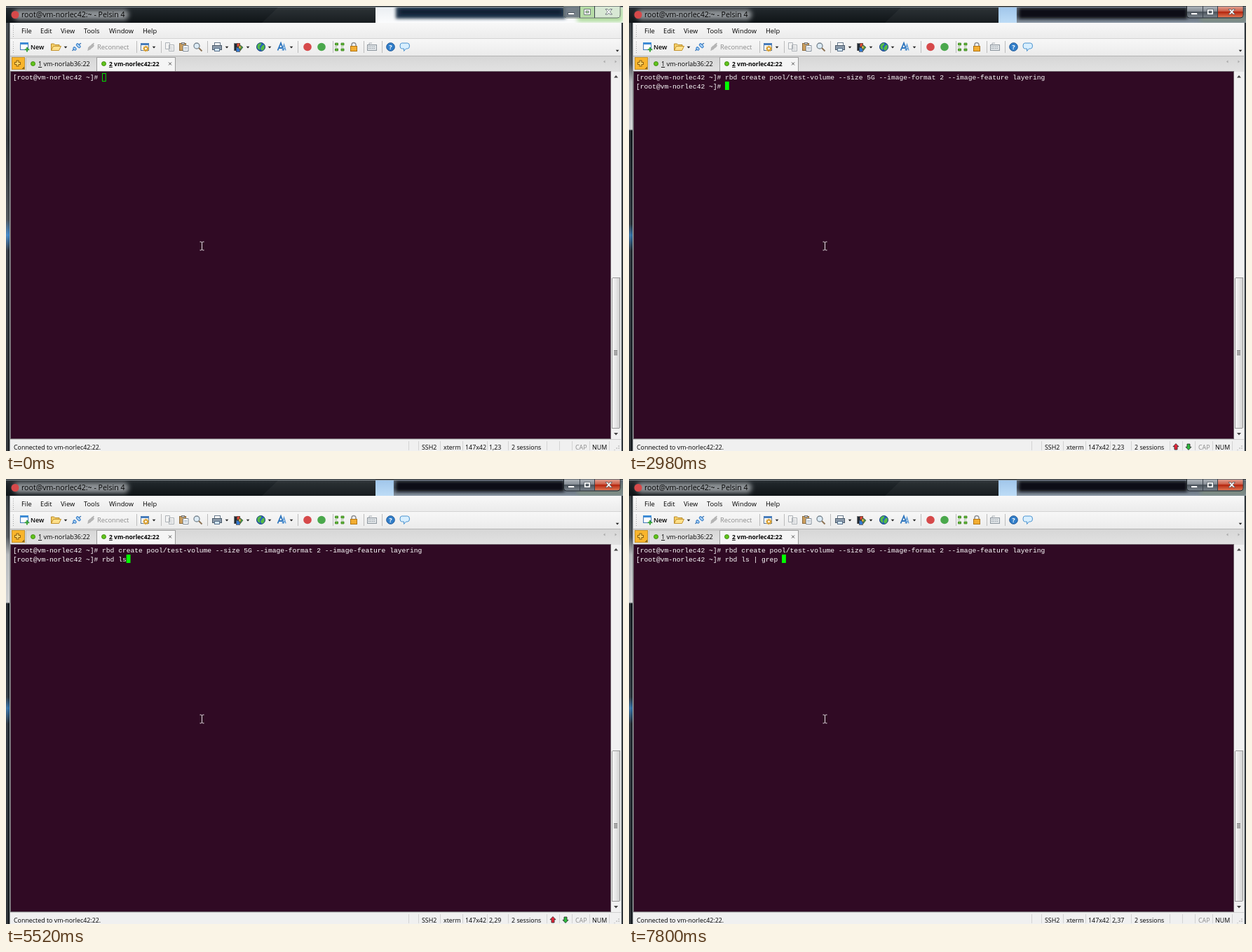
Recreate the animation shown at these times as an HTML page. Size 880x636 px, loop 8000 ms.

```html
<!DOCTYPE html>
<html lang="en">
<head>
<meta charset="utf-8">
<title>Terminal session</title>
<style>
  html, body { margin: 0; width: 100%; height: 100%; overflow: hidden; background: #111; }
  svg { display: block; width: 880px; height: 636px; }
  text { font: 9.3px "Open Sans", "Noto Sans", sans-serif; fill: #000; white-space: pre; }
  rect, .crisp { shape-rendering: crispEdges; }
  .status text { font-size: 8.9px; }
  .title { font-size: 10.6px; }
  .tab { font-size: 9px; }
  .tab.bold { font-weight: 700; font-size: 8.5px; }
  .dim { fill: #8b8b8b; }
  .term text { font: 9.65px "Liberation Mono", "Courier New", monospace; fill: #fff; }
  .idle .active, svg:not(.idle) .inactive { display: none; }
  .line { fill: none; stroke-width: 1; }
  #cursor { fill: #00ff00; shape-rendering: auto; }
  .idle #cursor { fill: none; stroke: #00e000; }
</style>
</head>
<body>
<svg id="stage" class="idle" viewBox="0 0 880 636">
  <defs>
    <linearGradient id="dark" x2="0" y2="1">
      <stop offset="0" stop-color="#3a4045"/><stop offset=".25" stop-color="#20262a"/><stop offset="1" stop-color="#0f1417"/>
    </linearGradient>
    <linearGradient id="pale" x2="0" y2="1">
      <stop offset="0" stop-color="#e9edf1"/><stop offset="1" stop-color="#fbfcfd"/>
    </linearGradient>
    <linearGradient id="sky" x2="0" y2="1">
      <stop offset="0" stop-color="#9fc5ea"/><stop offset="1" stop-color="#bddcf6"/>
    </linearGradient>
    <linearGradient id="slate" x2="0" y2="1">
      <stop offset="0" stop-color="#66717d"/><stop offset=".5" stop-color="#4c5763"/><stop offset="1" stop-color="#8995a2"/>
    </linearGradient>
    <linearGradient id="red" x2="0" y2="1">
      <stop offset="0" stop-color="#e2a090"/><stop offset=".45" stop-color="#cb5b45"/><stop offset=".5" stop-color="#b5260f"/><stop offset="1" stop-color="#dd7350"/>
    </linearGradient>
    <linearGradient id="glass" x2="0" y2="1">
      <stop offset="0" stop-color="#b4bac0"/><stop offset=".45" stop-color="#868d95"/><stop offset=".5" stop-color="#4b535b"/><stop offset="1" stop-color="#7d868f"/>
    </linearGradient>
    <linearGradient id="bar" x2="0" y2="1">
      <stop offset="0" stop-color="#f8f8f8"/><stop offset="1" stop-color="#ebebeb"/>
    </linearGradient>
    <linearGradient id="tabs" x2="0" y2="1">
      <stop offset="0" stop-color="#d6d6d6"/><stop offset="1" stop-color="#e2e2e2"/>
    </linearGradient>
    <linearGradient id="thumb">
      <stop offset="0" stop-color="#f6f6f6"/><stop offset=".5" stop-color="#e6e6e6"/><stop offset="1" stop-color="#cfcfcf"/>
    </linearGradient>
    <linearGradient id="edgeIdle" x2="0" y2="1">
      <stop offset="0" stop-color="#3b4044"/><stop offset=".3" stop-color="#24282c"/><stop offset=".48" stop-color="#464c52"/>
      <stop offset=".515" stop-color="#3d86c9"/><stop offset=".55" stop-color="#2a3037"/><stop offset="1" stop-color="#202428"/>
    </linearGradient>
    <linearGradient id="edgeOn" x2="0" y2="1">
      <stop offset="0" stop-color="#1d2327"/><stop offset=".13" stop-color="#4b5054"/><stop offset=".17" stop-color="#b9bcbe"/>
      <stop offset=".277" stop-color="#d5d6d7"/><stop offset=".28" stop-color="#12181d"/><stop offset=".49" stop-color="#262e36"/>
      <stop offset=".515" stop-color="#2f6ea6"/><stop offset=".55" stop-color="#20272e"/><stop offset="1" stop-color="#1b2025"/>
    </linearGradient>
    <filter id="blur" x="-20%" y="-60%" width="140%" height="220%"><feGaussianBlur stdDeviation="3"/></filter>
    <filter id="haze" x="-5%" y="-60%" width="110%" height="220%"><feGaussianBlur stdDeviation="2"/></filter>
    <clipPath id="cap"><rect width="880" height="24"/></clipPath>
    <path id="drop" d="M-2.3-1.2h4.6L0 1.4z" fill="#222"/>
    <path id="arrow" d="M0-4.5L4-.3H2V4h-4V-.3h-2z" stroke="#222" stroke-width=".8"/>
  </defs>

  <!-- window frame -->
  <rect class="inactive" width="7" height="636" fill="url(#edgeIdle)"/>
  <rect class="active" width="7" height="636" fill="url(#edgeOn)"/>
  <g class="crisp">
    <path d="M1.5 24V636" stroke="#aab2b8" opacity=".35"/>
    <path d="M5.5 24V636" stroke="#8c9194"/>
    <rect x="876" width="4" height="636" fill="#30363b"/>
    <path d="M877.5 24V636" stroke="#c9cdd0"/>
  </g>

  <g clip-path="url(#cap)">
    <rect width="880" height="24" fill="url(#dark)"/>
    <path d="M390 0H527V24H365z" fill="#fff" opacity=".04"/>
    <g class="inactive">
      <rect x="527" width="353" height="24" fill="url(#pale)"/>
      <rect x="556" y="1" width="242" height="17" fill="#24344c" filter="url(#haze)"/>
      <rect x="562" y="5" width="230" height="7" fill="#111d31" filter="url(#haze)"/>
      <rect x="815" y="1" width="65" height="22" fill="#b0dc9d" filter="url(#blur)"/>
    </g>
    <g class="active">
      <rect x="527" width="27" height="24" fill="url(#sky)"/>
      <rect x="553" width="327" height="24" fill="url(#slate)"/>
      <rect x="556" y="3" width="240" height="15" fill="#0a0f15" filter="url(#haze)"/>
      <rect x="815" y="6" width="65" height="18" fill="#7f8d84" filter="url(#blur)"/>
    </g>
    <rect x="11" y="5" width="164" height="15" rx="7" fill="#8d9295" filter="url(#blur)"/>
    <path class="crisp" d="M0 .5H880" stroke="#23282c"/>
    <path class="crisp" d="M0 1.5H880" stroke="#8a9297"/>
  </g>
  <circle cx="13" cy="12.5" r="5.5" fill="#d6494a"/>
  <text class="title" x="22" y="16">root@vm-norlec42:~ - Pelsin 4</text>

  <!-- caption buttons -->
  <g class="inactive">
    <path d="M795.5 0V13q0 4 4 4H872q4 0 4-4V0z" fill="#eef3f0" fill-opacity=".55" stroke="#66706c"/>
    <rect x="796" y="1" width="22" height="15" fill="#4d5966" opacity=".75"/>
    <rect x="819" y="1" width="20" height="15" fill="#b6dda6"/>
    <rect x="840" y="1" width="35" height="15" fill="#d8e8d4"/>
  </g>
  <g class="active">
    <path d="M795.5 0V13q0 4 4 4H872q4 0 4-4V0z" fill="url(#glass)" stroke="#20262c"/>
    <path d="M840 1H875.5V13q0 3-3 3H840z" fill="url(#red)"/>
  </g>
  <path class="crisp" d="M818.5 0V17M839.5 0V17" stroke="#39414a"/>
  <g stroke="#414b54" stroke-width=".7" fill="#fff">
    <rect x="801.5" y="9.5" width="9" height="3"/>
    <path d="M824.5 4.5h9v8h-9zM827 7v3h4V7z" fill-rule="evenodd"/>
    <path d="M855 4.5h3l1.7 2 1.7-2h3L861.3 8.3 864.5 12h-3l-1.8-2-1.8 2h-3L858.1 8.3z"/>
  </g>

  <!-- menu, toolbar and tab strips -->
  <rect x="6" y="24" width="871" height="23" fill="url(#bar)"/>
  <rect x="6" y="46" width="871" height="25" fill="url(#bar)"/>
  <path class="crisp" d="M6 46.5H877" stroke="#d4d4d4"/>
  <path class="crisp" d="M10.5 28V44M10.5 51V67" stroke="#a5a5a5" stroke-dasharray="1 2"/>
  <g id="menu"></g>
  <rect x="6" y="71" width="871" height="23" fill="url(#tabs)"/>
  <path class="crisp" d="M6 71.5H877" stroke="#b4b4b4"/>
  <path class="crisp" d="M186.5 50V67M221.5 50V67M287.5 50V67M416.5 50V67M466.5 50V67M510.5 50V67M536.5 50V67" stroke="#bcbcbc"/>
  <g id="drops"></g>

  <!-- toolbar icons -->
  <g class="line">
    <rect x="20.5" y="52.5" width="11" height="10" fill="#fff" stroke="#3f78b8"/>
    <path d="M20 53.5H32" stroke="#3d8bd5" stroke-width="3"/>
    <path d="M30 59V65.5M26.8 62.2H33.3" stroke="#3aa33a" stroke-width="2"/>
    <path d="M64.5 63.5V54h4l1.5 1.5h6V58" fill="#f5cf69" stroke="#b98a27"/>
    <path d="M64.5 63.5L67.5 57.5H78.5L75.5 63.5z" fill="#ffe08a" stroke="#c3932e"/>
    <g stroke-linecap="round">
      <path d="M95 63.5l3-3M103.500 55.500l3-2" stroke="#3b73b1" stroke-width="1.5"/>
      <path d="M97.500 60.500l1 1M102 55.500l2.500 2.500" stroke="#3b82cc" stroke-width="4.5"/>
      <path d="M97.500 60.500l1 1M102 55.500l2.500 2.500" stroke="#b6d9f6" stroke-width="2"/>
      <path d="M117 63l2-2M123 55.500l2-2" stroke="#aaa" stroke-width="1.5"/>
      <path d="M119 60.500l1.500-1.500M122 58l1.500-1.500" stroke="#b5b5b5" stroke-width="4.500"/>
    </g>
    <rect x="192.5" y="53.5" width="11" height="10" fill="#fff" stroke="#5a7697"/>
    <path d="M192 54.500H204" stroke="#477cba" stroke-width="3"/>
    <circle cx="199.5" cy="61" r="3.3" stroke="#dc9f28" stroke-width="2" stroke-dasharray="1.500 .8"/>
    <circle cx="199.5" cy="61" r="2.2" stroke="#d69b2b" stroke-width="1.5"/>
    <path d="M227.5 52.500h6v9h-6zM232.500 55.500h7v9h-7z" fill="#f3f3f3" stroke="#adb2b7"/>
    <path d="M234 58.500h4M234 60.500h4M234 62.500h4" stroke="#ccd0d3"/>
    <rect x="247.5" y="53.5" width="9" height="10" fill="#c99d5d" stroke="#8d6b3c"/>
    <rect x="250" y="52" width="4" height="2.5" fill="#ddd" stroke="#777"/>
    <path d="M252.5 56.500h7.500v8h-7.500z" fill="#fff" stroke="#7c8996"/>
    <path d="M254 59.500h4.500M254 61.500h4.500" stroke="#9fb2c6"/>
    <circle cx="272" cy="57" r="4" fill="#dcebf5" stroke="#7a8791" stroke-width="1.3"/>
    <path d="M275 60l4.500 4.500" stroke="#8d7456" stroke-width="2"/>
    <rect x="297.5" y="52.5" width="8" height="5" fill="#fff" stroke="#66788a"/>
    <rect x="294.5" y="56.5" width="13" height="6" fill="#8c9bab" stroke="#4b5b6b"/>
    <rect x="297.5" y="60.5" width="7" height="4" fill="#d4e7f7" stroke="#5a718a"/>
    <g stroke="#444" stroke-width=".7">
      <rect x="325.5" y="53.5" width="7" height="10" fill="#202a34"/>
      <rect x="329" y="53" width="4.5" height="5" fill="#e44a34"/>
      <rect x="328" y="59" width="5" height="6" fill="#3178d2"/>
      <path d="M333 55l5 4-4 5z" fill="#40ae42"/>
      <path d="M332 57h3v4h-3z" fill="#f3ce3f"/>
    </g>
    <circle cx="363.5" cy="58.5" r="6" fill="#2561bd" stroke="#173f7c"/>
    <path d="M358.500 56q2-3.500 6-3l-1 3-2 2 1 2-1 3-3-3zM365 57l3-2 1 3-1 4-3 2-2-3z" fill="#55bb46"/>
    <path d="M387.500 63.500L392 53l4 10.500M389 60h5.500" stroke="#2e75bd" stroke-width="1.8"/>
    <path d="M394 63.500L396.500 55l2.500 8.500M395 61h3.500" stroke="#5b9ad6" stroke-width="1.3"/>
    <circle cx="430" cy="58.5" r="5.8" fill="#d6494a"/>
    <circle cx="450" cy="58.5" r="5.8" fill="#4aa84c"/>
    <g fill="#5fba35" stroke="#387d1c" stroke-width=".8">
      <path d="M469.500 53h4v3h-4zM478 53h4v3h-4zM469.500 61h4v3h-4zM478 61h4v3h-4z"/>
      <path d="M469 58.500h4M478 58.500h4" stroke-dasharray="1 1"/>
    </g>
    <path d="M493 58V55.500a3 3 0 0 1 6 0V58" stroke="#8c8f92" stroke-width="1.5"/>
    <rect x="491.5" y="57.5" width="9" height="6.5" fill="#f2ad31" stroke="#b27513"/>
    <rect x="515.5" y="55.5" width="13" height="8" fill="#dfe3e6" stroke="#8e979f"/>
    <path d="M517 58h10M517 60.500h10" stroke="#96a0a8" stroke-dasharray="1.500 1"/>
    <path d="M518 55v-2h4" stroke="#a8afb5"/>
    <circle cx="548.5" cy="58.5" r="5.8" fill="#317ec9" stroke="#1d5797"/>
    <path d="M564.500 53h8q3 0 3 4t-3 4h-2l-3 3.500v-3.500h-3q-2.500 0-2.500-4t2.500-4z" fill="#d8efff" stroke="#4b93cf"/>
  </g>
  <text x="546.2" y="62" style="font-weight:700;fill:#fff">?</text>
  <text x="35" y="62" style="font-weight:600;font-size:9px">New</text>
  <text class="dim" x="130" y="62">Reconnect</text>

  <!-- tabs -->
  <rect x="8.5" y="73.5" width="18" height="17" fill="#f9b52c" stroke="#c2912b"/>
  <path d="M12 82h9M16.500 77.500v9" stroke="#8a5f10" stroke-width="4"/>
  <path d="M13 82h7M16.500 78.500v7" stroke="#ffd564" stroke-width="2"/>
  <path class="crisp" d="M26 90h-4l4-4z" fill="#8a671e"/>
  <path class="crisp" d="M28.5 92V73.5H129" fill="none" stroke="#bdbdbd"/>
  <path class="crisp" d="M129.5 94V73.5H241.5V94" fill="#f5f5f5" stroke="#9b9b9b"/>
  <g fill="#62c51c" stroke="#36820b" stroke-width=".9">
    <circle cx="38.5" cy="82.5" r="3"/><circle cx="139.5" cy="82.5" r="3"/>
  </g>
  <text class="tab" x="46" y="86"><tspan text-decoration="underline">1</tspan> vm-norlab36:22</text>
  <text class="tab bold" x="147" y="86"><tspan text-decoration="underline">2</tspan> vm-norlec42:22</text>
  <path d="M232 80.500l4 4m0-4l-4 4" stroke="#555"/>
  <path d="M854.500 77.500v4l-2.500-2zM868.500 77.500v4l2.500-2z" fill="#aaa"/>

  <!-- terminal -->
  <rect x="6" y="93" width="857" height="526" fill="#6f666d"/>
  <rect x="7" y="94" width="855" height="524" fill="#300a24"/>
  <g class="term">
    <rect id="cursor"/>
    <text id="row1" x="10" y="105"></text>
    <text id="row2" x="10" y="117.5"></text>
  </g>
  <path d="M276.500 337h2l1 1 1-1h2M279.500 338v10M276.500 349h2l1-1 1 1h2" fill="none" stroke="#e4dfe2"/>

  <!-- scrollbar -->
  <rect x="863" y="94" width="14" height="525" fill="#f1f1f1"/>
  <path d="M867 102.500h6l-3-3.500zM867 610h6l-3 3.500z" fill="#444"/>
  <rect x="864.5" y="388.5" width="11" height="215" rx="1.5" fill="url(#thumb)" stroke="#989898"/>
  <path class="crisp" d="M867 492.500h5M867 494.500h5M867 496.500h5M867 498.500h5" stroke="#656565"/>

  <!-- status bar -->
  <g class="status">
    <rect x="6" y="619" width="871" height="17" fill="#f0f0f0"/>
    <path class="crisp" d="M6 619.500H877" stroke="#d0d0d0"/>
    <g id="seps" stroke="#d3d3d3" class="crisp"></g>
    <text id="note" x="11" y="633.5"></text>
    <text x="593" y="633.5">SSH2</text>
    <text x="624" y="633.5">xterm</text>
    <text x="655" y="633.5">147x42</text>
    <text id="pos" x="689" y="633.5"></text>
    <text x="721" y="633.5">2 sessions</text>
    <text class="dim" x="812" y="633.5">CAP</text>
    <text x="836" y="633.5">NUM</text>
    <use id="up" href="#arrow" x="780" y="630" fill="#e8263a"/>
    <use id="down" href="#arrow" transform="translate(798 630) scale(1 -1)" fill="#2dbd3c"/>
    <path d="M874 628v6M871 631v3M868 634v1" stroke="#aaa" stroke-dasharray="2 1"/>
  </g>
</svg>

<script>
const $ = id => document.getElementById(id);
const LOOP = 8000, CELL = 5.79;
const PROMPT = '[root@vm-norlec42 ~]# ';
const PASTED = 'rbd create pool/test-volume --size 5G --image-format 2 --image-feature layering';
const TYPED = 'rbd ls | grep ';
const ACTIVATE = 500, PASTE = 1590, ENTER = 2980;

// One time per typed character; the last two land together.
const keys = [3910, 4210, 4510, 4750, 5400, 5520, 5640, 6650, 6800, 6950, 7260, 7410, 7550, 7550];

// Traffic lights: [on, off] spans.
const shared = [[1590, 1740], [2980, 3130], [4510, 4630], [4750, 5000], [5400, 5890], [6650, 7800]];
const sending = [...shared, [3910, 4060], [4210, 4360], [6350, 6500]];
const receiving = [...shared, [3910, 4360]];

$('menu').innerHTML = [['File', 22], ['Edit', 49], ['View', 78], ['Tools', 111], ['Window', 147], ['Help', 195]]
  .map(([name, x]) => `<text x="${x}" y="39">${name}</text>`).join('');
$('drops').innerHTML = [[85, 59], [211, 59], [315, 59], [345, 59], [376, 59], [407, 59], [872, 64]]
  .map(([x, y]) => `<use href="#drop" x="${x}" y="${y}"/>`).join('');
$('seps').innerHTML = [574, 588, 619, 651, 686, 716, 771, 789, 807, 832, 860]
  .map(x => `<path d="M${x + .5} 622V635"/>`).join('');

const within = (spans, t) => spans.some(([on, off]) => t >= on && t < off);
const show = (id, on) => $(id).setAttribute('visibility', on ? 'visible' : 'hidden');

function setText(id, value) {
  if ($(id).textContent !== value) $(id).textContent = value;
}

function placeCursor(row, col, hollow) {
  const inset = hollow ? .5 : 0;
  const box = {
    x: 9.6 + col * CELL + inset,
    y: (row === 1 ? 96 : 108) + inset,
    width: 5.8 - 2 * inset,
    height: 12 - 2 * inset
  };
  for (const name in box) $('cursor').setAttribute(name, box[name]);
}

function render(t) {
  const idle = t < ACTIVATE;
  const row1 = PROMPT + (t >= PASTE ? PASTED : '');
  const row2 = t >= ENTER ? PROMPT + TYPED.slice(0, keys.filter(k => t >= k).length) : '';
  const row = row2 ? 2 : 1;
  const col = (row2 || row1).length;

  $('stage').classList.toggle('idle', idle);
  setText('row1', row1);
  setText('row2', row2);
  setText('pos', `${row},${col + 1}`);
  setText('note', t >= PASTE && t < ENTER ? '79 character(s) pasted.' : 'Connected to vm-norlec42:22.');
  placeCursor(row, col, idle);
  show('up', within(sending, t));
  show('down', within(receiving, t));
}

const start = performance.now();
function tick() {
  render((performance.now() - start) % LOOP);
  requestAnimationFrame(tick);
}
tick();
</script>
</body>
</html>
```
